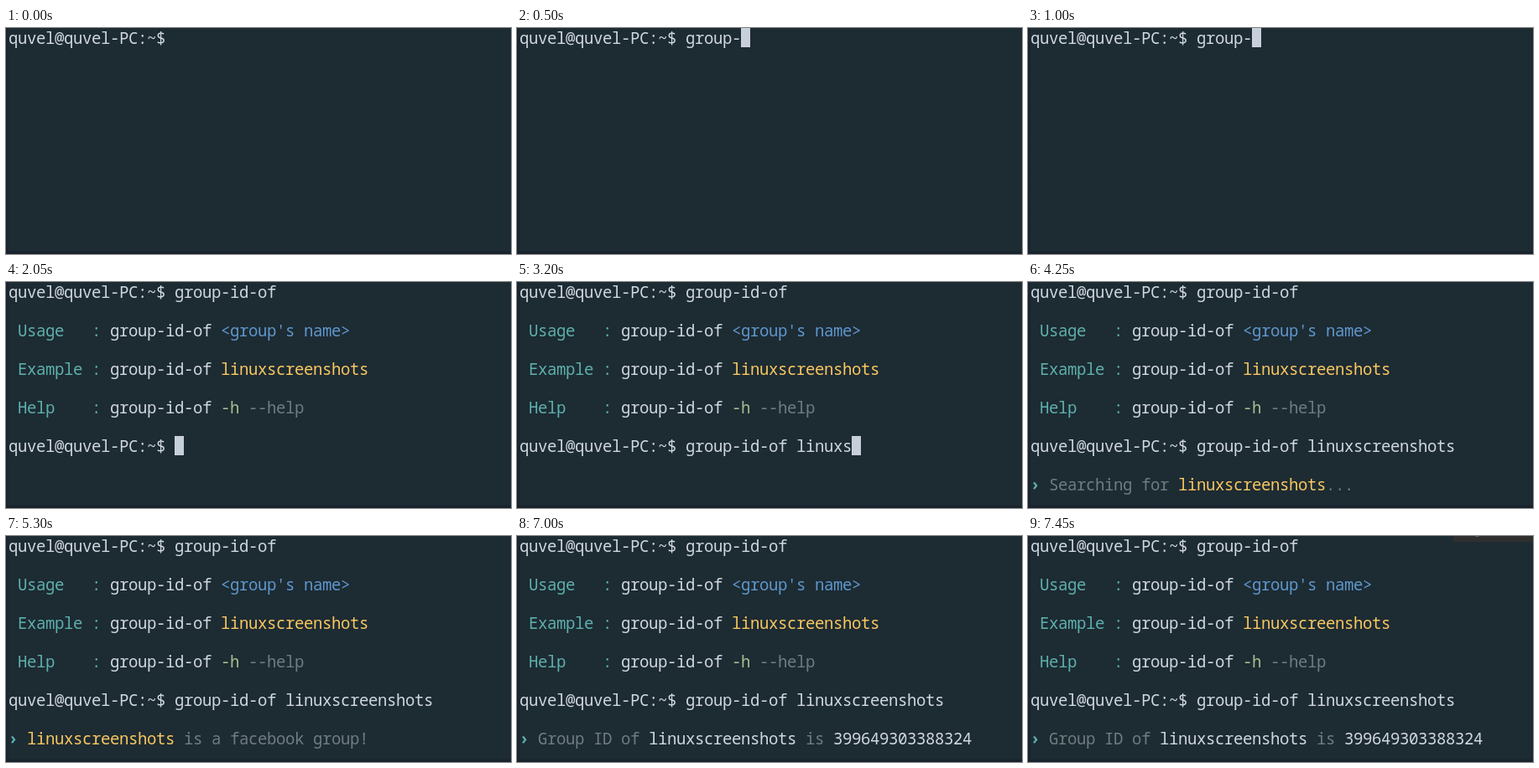
These frames come from a looping animation (602 by 270 pixels, 7500 ms). An HTML page:

```html
<!DOCTYPE html>
<html lang="en">
<head>
<meta charset="utf-8">
<title>group-id-of</title>
<style>
  html, body { margin: 0; width: 100%; height: 100%; overflow: hidden; background: #1d2b33; }
  #stage { position: relative; width: 602px; height: 270px; overflow: hidden; background: #1d2b33; }
  #edge {
    position: absolute; inset: 0;
    background:
      linear-gradient(90deg, #17202b, #1d2b3300) 0 0 / 4px 100% no-repeat,
      linear-gradient(0deg, #161f2b, #18242e 60%, #1d2b3300) 0 100% / 100% 4px no-repeat;
  }
  .row, #cursor { position: absolute; left: 3px; height: 23px; }
  .row {
    white-space: pre; color: #d0d7df;
    font: 19px/24px "Noto Sans Mono", "DejaVu Sans Mono", monospace;
    letter-spacing: -0.4px;
  }
  #cursor { width: 11px; background: #c7cfdb; }
  .teal { color: #5eb0ac; }
  .blue { color: #5f97cc; }
  .gold { color: #f8c75f; }
  .green { color: #a5bf90; }
  .gray { color: #6f7c80; }
  .bold { font-weight: 700; }
  #popup {
    position: absolute; left: 507px; top: 0; width: 95px; height: 7px;
    overflow: hidden; background: #302f30; border-radius: 0 0 0 2px;
  }
  #popup::after {
    content: ""; position: absolute; left: 24px; top: -8px; width: 7px; height: 7px;
    border: 1px solid #77797a; border-radius: 50%;
  }
</style>
</head>
<body>
<div id="stage">
  <div id="edge"></div>
  <div id="cursor"></div>
  <div id="popup"></div>
</div>
<script>
const LOOP = 7500, STEP = 50, CELL = 11, ROW = 23;
const PROMPT = "quvel@quvel-PC:~$ ";
const COMMAND = "group-id-of";
const GROUP = "linuxscreenshots";
const FULL = `${COMMAND} ${GROUP}`;

const stage = document.getElementById("stage");
const cursor = document.getElementById("cursor");
const popup = document.getElementById("popup");

function place(element, row, column) {
  element.style.top = `${row * ROW}px`;
  element.style.left = `${3 + column * CELL}px`;
}

function show(element, visible) {
  element.style.visibility = visible ? "visible" : "hidden";
}

// Each run is [text, class]; runs follow one another from the given column.
function addRow(row, column, ...runs) {
  const line = document.createElement("div");
  line.className = "row";
  place(line, row, column);
  for (const [text, style = ""] of runs) {
    const span = document.createElement("span");
    span.className = style;
    span.textContent = text;
    line.append(span);
  }
  stage.insertBefore(line, cursor);
  return line;
}

const help = [
  ["Usage   : ", ["<group's name>", "blue"]],
  ["Example : ", [GROUP, "gold"]],
  ["Help    : ", ["-h ", "green"], ["--help", "gray"]],
].map(([label, ...runs], i) => addRow(2 + 2 * i, 1, [label, "teal"], [`${COMMAND} `], ...runs));

const firstLine = addRow(0, 0);
const secondLine = addRow(8, 0);
const arrow = addRow(10, 0, ["›", "teal bold"]);
const searching = addRow(10, 2, ["Searching for ", "gray"], [GROUP, "gold"], ["...", "gray"]);
const found = addRow(10, 2, [GROUP, "gold"], [" is a facebook group!", "gray"]);
const result = addRow(10, 2, ["Group ID of ", "gray"], [GROUP], [" is ", "gray"], ["399649303388324"]);

// Bursts of evenly spaced keys: first key, last key, text on the line afterwards.
const firstBursts = [
  [50, 300, "group"],
  [500, 700, "group-id-"],
  [850, 1000, "group-"],
  [1150, 1350, COMMAND],
];
const secondBursts = [
  [2450, 2750, `${COMMAND} linu`],
  [2950, 2950, `${COMMAND} linux`],
  [3200, 3600, `${COMMAND} linuxscreen`],
  [3750, 3950, FULL],
];

function typedLength(bursts, t, length = 0) {
  for (const [start, end, text] of bursts) {
    if (t < start) break;
    const change = text.length - length;
    const keys = Math.abs(change);
    const progress = t >= end ? 1 : (t - start) / (end - start);
    length += Math.sign(change) * (1 + Math.floor(progress * (keys - 1)));
  }
  return length;
}

function draw(t) {
  const first = typedLength(firstBursts, t);
  const second = t < 2250 ? 0 : typedLength(secondBursts, t, COMMAND.length);
  firstLine.textContent = PROMPT + COMMAND.slice(0, first);
  secondLine.textContent = PROMPT + FULL.slice(0, second);

  for (const line of help) show(line, t >= 1500);
  show(secondLine, t >= 1550);
  show(arrow, t >= 4200);
  show(searching, t >= 4200 && t < 5250);
  show(found, t >= 5250 && t < 7000);
  show(result, t >= 7000);

  if (t < 1450) place(cursor, 0, PROMPT.length + first);
  else if (t < 1550) place(cursor, t < 1500 ? 1 : 7, 0);
  else if (t < 4050) place(cursor, 8, PROMPT.length + second);
  else place(cursor, 9, 0);
  const blinkedOff = t >= 1700 && t < 2000;
  show(cursor, t >= 50 && t < 4200 && !blinkedOff);

  const slide = Math.max(-8, (t - 7450) / 12.5);
  popup.style.transform = `translateY(${slide}px)`;
}

function tick() {
  const t = performance.now() % LOOP;
  draw(t - t % STEP);
  requestAnimationFrame(tick);
}
tick();
</script>
</body>
</html>
```
